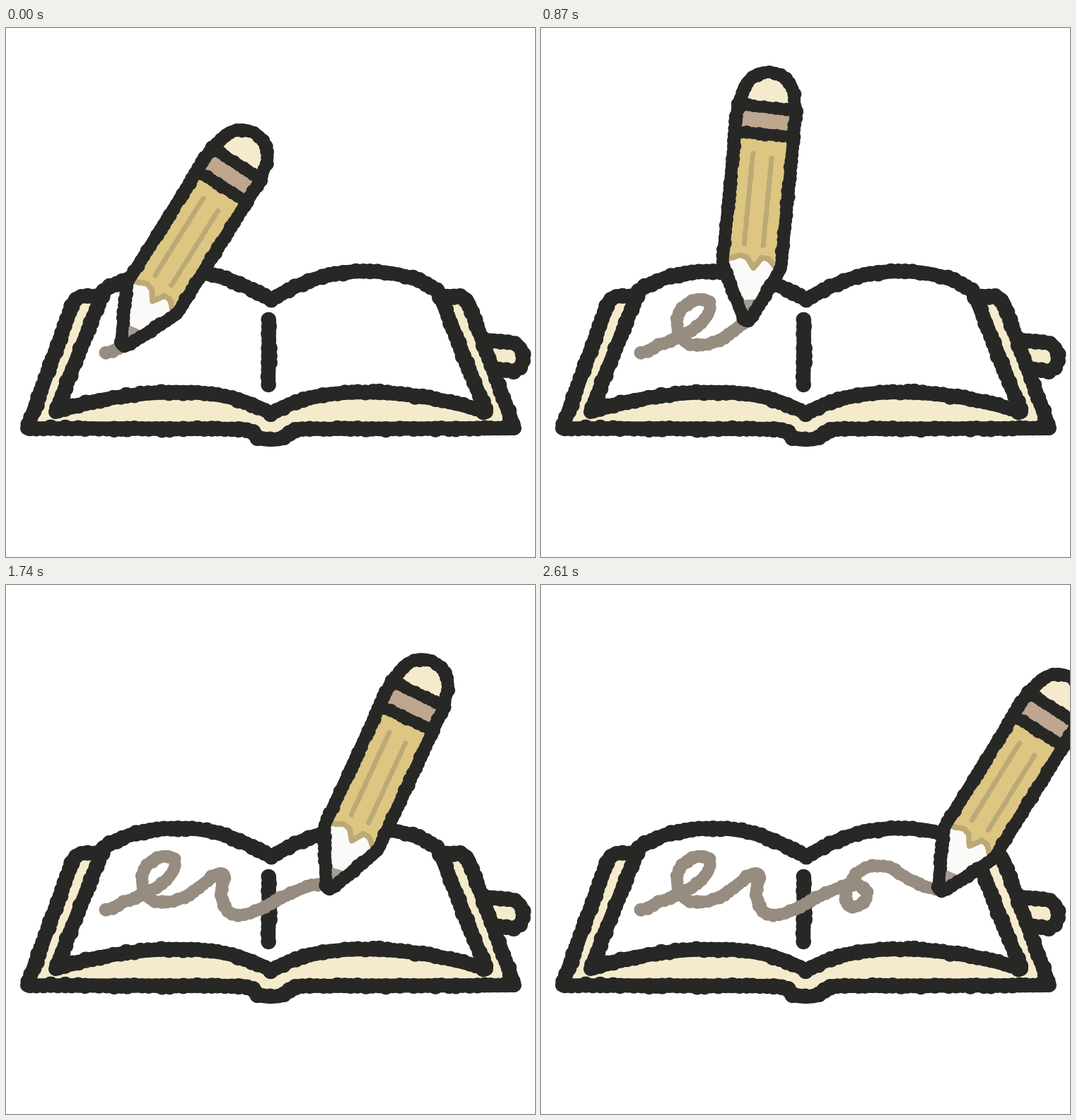
Animation of 748 by 748 pixels, one loop 2900 ms. Source, as an HTML page:

```html
<!DOCTYPE html>
<html lang="en">
<head>
<meta charset="utf-8">
<title>Pencil writing in a book</title>
<style>
  html, body { margin: 0; width: 100%; height: 100%; overflow: hidden; background: #fff; }
  svg { display: block; width: 100vw; height: 100vh; }
</style>
</head>
<body>
<svg id="stage" viewBox="0 0 748 748"></svg>
<script>
const NS = 'http://www.w3.org/2000/svg';
const DARK = '#272826', CREAM = '#f5ebcc', YELLOW = '#dcc682', GRAIN = '#bbaa76',
      BAND = '#bea68f', LEAD = '#a79c92', WOOD = '#fafaf8', INK = '#968c80';
const STEP = 290;

let seed = 7;
const rand = () => (seed = (seed * 16807) % 2147483647) / 2147483647;
const jitter = a => (rand() * 2 - 1) * a;

function add(parent, tag, attrs = {}) {
  const el = document.createElementNS(NS, tag);
  for (const k in attrs) el.setAttribute(k, attrs[k]);
  return parent.appendChild(el);
}

const fill = (parent, d, color) => add(parent, 'path', { d, fill: color });

const dab = (x, y, r) => `M${x - r} ${y}a${r} ${r} 0 1 0 ${2 * r} 0a${r} ${r} 0 1 0 ${-2 * r} 0z`;

// Rough brush stroke: a core line with uneven round dabs along it.
function brush(parent, d, w, color = DARK) {
  const core = add(parent, 'path', {
    d, fill: 'none', stroke: color, 'stroke-width': w * 0.9,
    'stroke-linecap': 'round', 'stroke-linejoin': 'round'
  });
  const len = core.getTotalLength();
  const n = Math.max(2, Math.round(len / (w * 0.45)));
  let dabs = '';
  for (let i = 0; i <= n; i++) {
    const p = core.getPointAtLength(len * i / n);
    dabs += dab(p.x + jitter(w * 0.05), p.y + jitter(w * 0.05), w / 2 * (1 + jitter(0.07)));
  }
  fill(parent, dabs, color);
}

// The book is one half drawn twice, mirrored about its spine.
function drawBook(g) {
  const tab = 'M680 441L710 444Q728 446 731 463Q732 481 717 485L698 483';
  const cover = 'M136 380L110 379Q99 380 94 391L30 566L335 567Q345 568 352 576Q356 582 375 582';
  const page = 'M375 384C335 362 300 344 243 344C205 344 165 352 138 372' +
    'L70 543C120 526 185 515 243 515C300 515 336 524 375 545';
  const both = draw => ['', 'translate(749 0) scale(-1 1)']
    .forEach(transform => draw(add(g, 'g', { transform })));

  fill(g, tab, CREAM);
  brush(g, tab, 21.5);
  both(half => fill(half, cover + 'V380Z', CREAM));
  both(half => fill(half, page + 'Z', '#fff'));
  both(half => {
    brush(half, cover, 22);
    brush(half, page, 22);
  });
  brush(g, 'M372 412L371 504', 22.5);
}

// Local origin is the pencil point; the shaft runs upwards.
function drawPencil(g) {
  const outline = 'M-5 -2Q0 5 5 -2L41 -77L41 -302L37 -315A37 37 0 0 0 -37 -315L-42 -302L-42 -77Z';
  const notch = 'L-17 -91L-8 -88L2 -74L13 -90L22 -89L36 -76';
  fill(g, outline, YELLOW);
  fill(g, 'M-40 -302L-37 -315A37 37 0 0 1 37 -315L40 -300Z', CREAM);
  fill(g, 'M-42 -303H41V-264H-42Z', BAND);
  fill(g, 'M0 0L-42 -77L-36 -83' + notch + 'L41 -77Z', WOOD);
  fill(g, 'M0 4L-20 -26L20 -32Z', LEAD);
  brush(g, 'M-35 -84' + notch, 8, GRAIN);
  brush(g, 'M-14 -235V-107', 7, GRAIN);
  brush(g, 'M13 -231V-107', 7, GRAIN);
  brush(g, outline, 19);
  brush(g, 'M-43 -303L43 -301', 18);
  brush(g, 'M-42 -264H42', 18);
}

// Each step: the ink it adds, ending where the pencil rests, and the pencil's lean.
const steps = [
  ['M142 460C150 457 158 453 166 448', 32],
  ['C200 440 240 415 239 393C238 378 214 382 202 394C190 406 190 422 197 436M216 423', 6.5],
  ['M197 436C201 443 209 449 220 448', 32],
  ['C245 450 262 437 291 413', 5.5],
  ['C306 402 314 408 306 424C302 436 306 448 309 454', 32],
  ['C318 474 345 470 388 442', 0],
  ['C415 431 440 416 456 428', 24.8],
  ['C468 440 454 457 438 455C426 450 428 430 446 409', 5.5],
  ['C460 394 485 394 500 403', 21],
  ['C522 418 540 428 565 431', 31.7]
];

const stage = document.getElementById('stage');
drawBook(add(stage, 'g'));

let pen = '';
const strokes = steps.map(([d, lean]) => {
  const ink = add(stage, 'g');
  brush(ink, pen && d[0] !== 'M' ? `M${pen}${d}` : d, 18.5, INK);
  pen = d.match(/\d+ \d+$/)[0];
  return { ink, pose: `translate(${pen}) rotate(${lean})` };
});

const pencil = add(stage, 'g');
drawPencil(pencil);

function render(ms) {
  const now = Math.floor(ms / STEP) % steps.length;
  pencil.setAttribute('transform', strokes[now].pose);
  strokes.forEach(({ ink }, i) => ink.setAttribute('visibility', i <= now ? 'visible' : 'hidden'));
}

const start = performance.now();
function tick() {
  render(performance.now() - start);
  requestAnimationFrame(tick);
}
tick();
</script>
</body>
</html>
```
